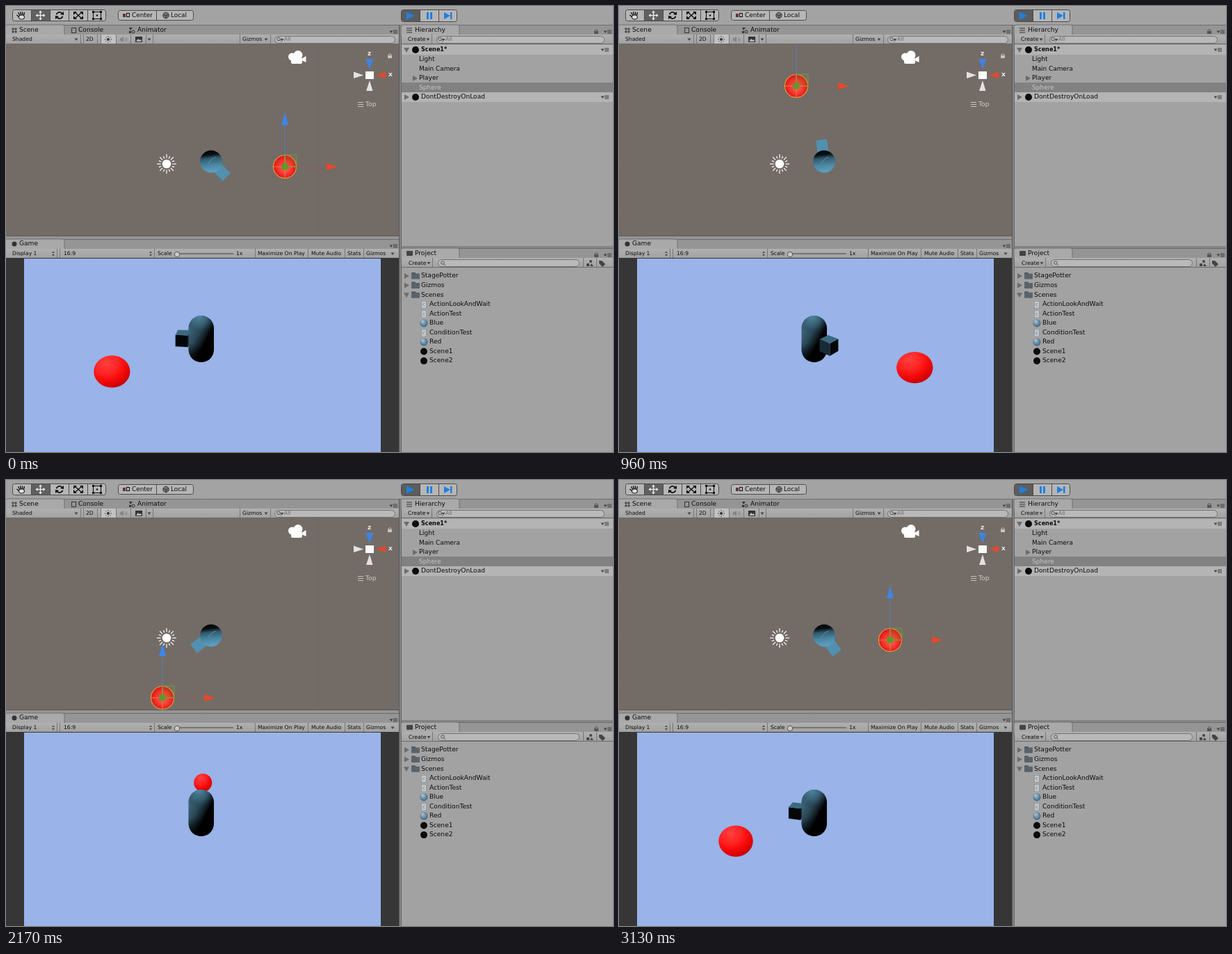
Write an HTML page with a canvas that moves like this. It is 873 px wide and 641 px high and loops after 3.17 s.

```html
<!DOCTYPE html>
<html>
<head>
<meta charset="utf-8">
<style>
html, body { margin: 0; width: 100%; height: 100%; overflow: hidden; background: #a2a2a2 }
canvas { display: block }
</style>
</head>
<body>
<canvas id="stage" width="873" height="641"></canvas>
<script>
const ctx = document.getElementById('stage').getContext('2d');
const LOOP = 3170, STEPS = 73, TAU = Math.PI * 2, INK = '#0c0c0c';
const rad = deg => deg * Math.PI / 180;

// step, ball x, ball y, game offset x, game offset y, look angle in scene, look angle in game
const KEYS = [
  [-13, 324, 309, 1, 0, 217, 217],
  [0, 401, 231, -1, 2, -45, -45],
  [10, 378, 149, -24, 0, 15, 15],
  [22, 255, 115, -3, 0, 97, 97],
  [33, 167, 198, 2, 7, 168, 97],
  [50, 225, 313, 4, 0, 217, 217],
  [59, 324, 309, 1, 0, 217, 217],
  [72, 390, 230, -2, 1, 306, 306],
  [82, 378, 149, -24, 0, 375, 375]
];

function pose(step) {
  let k = 1;
  while (k < 6 && step >= KEYS[k + 1][0]) k++;
  const [a, b, c, d] = KEYS.slice(k - 1, k + 3);
  const span = c[0] - b[0], u = (step - b[0]) / span;
  const lin = i => b[i] + (c[i] - b[i]) * u;
  const curve = i => {
    const m0 = (c[i] - a[i]) / (c[0] - a[0]) * span, m1 = (d[i] - b[i]) / (d[0] - b[0]) * span;
    const s = u * u * (3 - 2 * u);
    return b[i] + (c[i] - b[i]) * s + m0 * u * (1 - u) ** 2 - m1 * u * u * (1 - u);
  };
  return { x: curve(1), y: curve(2), dx: lin(3), dy: lin(4), look: lin(5), gameLook: lin(6) };
}

// drawing helpers
function rect(x, y, w, h, fill, stroke) {
  if (fill) { ctx.fillStyle = fill; ctx.fillRect(x, y, w, h); }
  if (stroke) { ctx.strokeStyle = stroke; ctx.lineWidth = 1; ctx.strokeRect(x + .5, y + .5, w - 1, h - 1); }
}
function pill(x, y, w, h, r, fill, stroke) {
  ctx.beginPath(); ctx.roundRect(x, y, w, h, r); paint(fill, stroke);
}
function paint(fill, stroke, width = 1) {
  if (fill) { ctx.fillStyle = fill; ctx.fill(); }
  if (stroke) { ctx.strokeStyle = stroke; ctx.lineWidth = width; ctx.stroke(); }
}
function dot(x, y, r, fill, stroke, width) {
  ctx.beginPath(); ctx.arc(x, y, r, 0, TAU); paint(fill, stroke, width);
}
function poly(fill, ...p) {
  ctx.beginPath();
  for (let i = 0; i < p.length; i += 2) ctx.lineTo(p[i], p[i + 1]);
  ctx.closePath(); paint(fill);
}
function line(color, width, ...p) {
  ctx.beginPath();
  for (let i = 0; i < p.length; i += 2) ctx.lineTo(p[i], p[i + 1]);
  paint(null, color, width);
}
function text(s, x, y, size = 9.1, color = INK, weight = '') {
  ctx.font = `${weight} ${size}px "DejaVu Sans", sans-serif`;
  ctx.textBaseline = 'middle';
  ctx.fillStyle = color;
  ctx.fillText(s, x, y);
}
function fade(g, ...stops) {
  stops.forEach(([p, c]) => g.addColorStop(p, c));
  return g;
}
const small = (s, x, y) => text(s, x, y, 7.65);
const down = (x, y) => poly('#444', x - 2.5, y - 1.5, x + 2.5, y - 1.5, x, y + 2);
const updown = (x, y) => { poly('#444', x - 2, y - 1, x + 2, y - 1, x, y - 3.5); poly('#444', x - 2, y + 1, x + 2, y + 1, x, y + 3.5); };
const menu = (x, y) => { down(x, y); for (const d of [-2, 0, 2]) line('#444', 1, x + 3, y + d, x + 9, y + d); };
const bars = (x, y, c) => { for (const d of [-3, 0, 3]) line(c, 1, x, y + d, x + 8, y + d); };
function lock(x, y, c) {
  rect(x - 3, y, 6, 4, c);
  ctx.beginPath(); ctx.arc(x, y, 2.2, Math.PI, TAU); paint(null, c);
}
function glass(x, y) { dot(x, y - .5, 2.3, null, '#555'); line('#555', 1, x + 1.7, y + 1.2, x + 4, y + 3.5); }
function fold(x, y, open) {
  if (open) poly('#6b6b6b', x - 4, y - 3, x + 4, y - 3, x, y + 4);
  else poly('#6b6b6b', x - 3, y - 4, x + 4, y, x - 3, y + 4);
}
function tabStrip(x, y, w, tabW) {
  rect(x, y, w, 14, '#959595');
  line('#6c6c6c', 1, x, y + .5, x + w, y + .5);
  pill(x - 1, y, tabW + 1, 15, [3, 3, 0, 0], '#a9a9a9', '#707070');
  menu(x + w - 11, y + 10);
}
function toolbar(x, y, w, seps) {
  rect(x, y, w, 14, fade(ctx.createLinearGradient(0, y, 0, y + 14), [0, '#b0b0b0'], [1, '#a1a1a1']));
  line('#6a6a6a', 1, x, y + 13.5, x + w, y + 13.5);
  for (const s of seps) line('#777', 1, s + .5, y, s + .5, y + 13);
}

function topBar() {
  rect(0, 0, 873, 27, '#a3a3a3');
  pill(9.5, 5.5, 134, 16, 3, '#b6b6b6', '#4b4b4b');
  rect(36, 6, 27, 15, '#606060');
  for (const x of [36, 63, 90, 117]) line('#4b4b4b', 1, x + .5, 6, x + .5, 21);
  // hand
  for (let i = 0; i < 4; i++) line(INK, 1.3, 20 + i * 1.8, 14, 17.5 + i * 3, 8 + Math.abs(i - 1.5) * .8);
  line(INK, 1.3, 19, 16, 15.5, 13);
  pill(18.5, 13, 8, 6, 3, '#ddd', INK);
  // move
  line('#eee', 1.3, 44, 13.5, 55, 13.5); line('#eee', 1.3, 49.5, 8, 49.5, 19);
  for (let i = 0; i < 4; i++) {
    ctx.save(); ctx.translate(49.5, 13.5); ctx.rotate(i * TAU / 4);
    poly('#eee', 7, 0, 4, -2.5, 4, 2.5); ctx.restore();
  }
  // rotate
  for (const a of [3.4, .26]) { ctx.beginPath(); ctx.arc(77, 13.5, 4.6, a, a + 2.3); paint(null, INK, 1.7); }
  poly(INK, 83, 8, 83, 13, 78, 12); poly(INK, 71, 19, 71, 14, 76, 15);
  // scale
  line(INK, 1.3, 99, 9, 109, 18); line(INK, 1.3, 109, 9, 99, 18);
  for (const [x, y, a, b] of [[97, 8, 1, 1], [111, 8, -1, 1], [97, 19, 1, -1], [111, 19, -1, -1]]) poly(INK, x, y, x + 5 * a, y, x, y + 5 * b);
  // rectangle
  rect(125, 8, 12, 11, null, INK);
  for (const x of [124, 135]) for (const y of [7, 17]) rect(x, y, 3, 3, INK);
  dot(131, 13.5, 1.2, INK);

  pill(161.5, 6.5, 108, 14, 3, '#b6b6b6', '#4b4b4b');
  line('#4b4b4b', 1, 216.5, 7, 216.5, 20);
  rect(168, 11, 4, 5, '#633'); rect(173, 10, 5, 6, null, INK);
  text('Center', 181, 13.5, 8.9);
  dot(230, 13.5, 4.2, '#777', '#333'); line('#333', 1, 226, 12, 230, 14, 234, 12); line('#333', 1, 230, 14, 230, 18);
  text('Local', 237, 13.5, 8.9);

  pill(568.5, 5.5, 80, 17, 3, '#b6b6b6', '#4b4b4b');
  rect(569, 6, 27, 16, '#5c5c5c');
  for (const x of [595, 622]) line('#4b4b4b', 1, x + .5, 6, x + .5, 22);
  const blue = '#1f7fe0';
  poly(blue, 576, 8.5, 588, 14, 576, 19.5);
  rect(605, 9, 3, 10, blue); rect(610, 9, 3, 10, blue);
  poly(blue, 630, 9, 639, 14, 630, 19); rect(639, 9, 2.5, 10, blue);
}

function leftPanels() {
  tabStrip(0, 27, 565, 84);
  for (const d of [10, 14]) { line('#333', 1, d, 31, d, 39); line('#333', 1, 8, d + 23, 16, d + 23); }
  text('Scene', 19, 35);
  rect(94, 31, 7, 8, null, '#333'); text('Console', 104, 35);
  poly('#333', 177, 31, 182, 31, 179, 35); dot(183, 37, 2, null, '#333'); rect(177, 36, 3, 3, '#333'); text('Animator', 189, 35);
  toolbar(0, 41, 565, [107, 111, 131, 136, 158, 179, 201, 211, 336, 380]);
  small('Shaded', 9, 48.5); down(101, 48); small('2D', 115, 48.5);
  rect(137, 41, 21, 13, '#c2c2c2');
  dot(147, 48, 2, '#333');
  for (let i = 0; i < 8; i++) {
    const c = Math.cos(i * TAU / 8), s = Math.sin(i * TAU / 8);
    line('#333', 1, 147 + 3.5 * c, 48 + 3.5 * s, 147 + 5 * c, 48 + 5 * s);
  }
  poly('#858585', 164, 46, 166, 46, 169, 43.5, 169, 52, 166, 50, 164, 50);
  for (const r of [2, 4]) { ctx.beginPath(); ctx.arc(170, 48, r, -.9, .9); paint(null, '#858585'); }
  rect(186, 44, 10, 8, '#333'); poly('#bbb', 187, 51, 190, 47, 192, 49, 194, 48, 195, 51);
  down(206, 48); small('Gizmos', 340, 48.5); down(374, 48);
  pill(386.5, 43.5, 173, 10, 5, '#b9b9b9', '#727272');
  glass(392, 48); down(397, 48.5); text('All', 400, 48.5, 7.65, '#6a6a6a');

  rect(0, 331, 565, 4, '#959595');
  tabStrip(0, 335, 565, 84);
  dot(12, 342, 3.5, '#333');
  text('Game', 19, 342);
  toolbar(0, 349, 565, [73, 77, 213, 358, 434, 487, 514]);
  small('Display 1', 9, 356); updown(68, 356); small('16:9', 83, 356); updown(208, 356);
  small('Scale', 218, 356.5);
  rect(245, 355, 82, 2, '#747474'); dot(246, 357, 3.7, '#c9c9c9', '#555');
  small('1x', 331, 356.5); small('Maximize On Play', 362, 356); small('Mute Audio', 439, 356);
  small('Stats', 491, 356); small('Gizmos', 518, 356); down(556, 356);
}

function rightPanels() {
  rect(565, 27, 4, 614, '#858585');
  line('#555', 1, 565.5, 27, 565.5, 641); line('#666', 1, 568.5, 27, 568.5, 641);
  tabStrip(569, 27, 304, 83);
  bars(576, 35, '#333'); text('Hierarchy', 588, 35); lock(849, 36, '#555');
  toolbar(569, 41, 304, [612]);
  small('Create', 578, 48.5); down(607, 48);
  pill(619.5, 43.5, 241, 10, 5, '#b9b9b9', '#727272');
  glass(624, 48); down(629, 48.5); text('All', 632, 48.5, 7.65, '#6a6a6a');
  rect(569, 55, 304, 290, '#a2a2a2');
  for (const y of [56, 124]) { rect(569, y, 304, 14, '#b4b4b4'); menu(858, y + 7); }
  rect(569, 110, 304, 14, '#818181');
  fold(576, 63, true); dot(589, 63, 5, INK); text('Scene1*', 597, 63, 8.1, INK, 'bold');
  text('Light', 594, 77, 9); text('Main Camera', 594, 90.5, 8.9);
  fold(588, 104); text('Player', 594, 104);
  text('Sphere', 594, 117.5, 9, '#c6c6c6');
  fold(576, 131); dot(589, 131, 5, INK); text('DontDestroyOnLoad', 597, 131);

  rect(569, 345, 304, 3, '#858585');
  tabStrip(569, 348, 304, 83);
  pill(576, 352, 9, 7, 1, '#444'); text('Project', 588, 355.5); lock(849, 357, '#555');
  toolbar(569, 362, 304, [613, 830, 849]);
  small('Create', 579, 370); down(608, 369.5);
  pill(621.5, 364.5, 203, 10, 5, '#b9b9b9', '#727272'); glass(628, 369.5);
  dot(841, 367, 2, '#444'); rect(835, 370, 4, 4, '#444'); poly('#444', 840, 374, 842, 370, 845, 374);
  poly('#444', 853, 366, 857, 366, 862, 371, 858, 375, 853, 370);
  rect(569, 376, 304, 265, '#a2a2a2');
  ['StagePotter', 'Gizmos', 'Scenes'].forEach((s, i) => {
    const y = 388 + i * 13.6;
    fold(576, y, i == 2);
    pill(583, y - 5, 6, 4, 1, '#4d555c'); pill(583, y - 3.5, 12, 8, 1, '#59636b');
    text(s, 597, y);
  });
  ['ActionLookAndWait', 'ActionTest', 'Blue', 'ConditionTest', 'Red', 'Scene1', 'Scene2'].forEach((s, i) => {
    const y = 428.8 + i * 13.55;
    if (i > 4) dot(601, y, 5, INK);
    else if (i == 2 || i == 4) dot(601, y, 5.5, fade(ctx.createRadialGradient(599, y - 3, 1, 601, y, 6), [0, '#a5c0d3'], [1, '#38607f']));
    else { rect(597, y - 5, 8, 11, '#c6cace', '#949494'); text('c', 599, y + .5, 7, '#4a78a5'); }
    text(s, 609, y);
  });
}

function sceneView(p) {
  ctx.save();
  ctx.beginPath(); ctx.rect(0, 55, 565, 276); ctx.clip();
  rect(0, 55, 565, 276, '#736b66');
  const grid = 'rgba(255,255,255,.02)';
  for (let x = 3; x < 565; x += 73) line(grid, 1, x + .5, 55, x + .5, 331);
  for (let y = 77; y < 331; y += 73) line(grid, 1, 0, y + .5, 565, y + .5);

  // player seen from above
  ctx.save(); ctx.translate(295, 223.5); ctx.rotate(-rad(p.look));
  rect(10, -8, 21.5, 16, '#5190b0'); ctx.restore();
  dot(295, 223.5, 16, fade(ctx.createLinearGradient(293, 207, 297, 240), [0, '#000'], [.2, '#0a1015'], [.36, '#315a6d'], [.65, '#4a86a3'], [1, '#62a4c6']));
  line('rgba(200,225,240,.35)', 1, 291, 226, 297, 219, 302, 217);

  // ball with its move handle
  const { x, y } = p;
  dot(x, y, 16.5, fade(ctx.createRadialGradient(x + 1, y + 3, 2, x, y, 17), [0, '#ff5a50'], [.6, '#f5302c'], [1, '#cf1512']), '#eb9a3a', 1.2);
  line('rgba(210,70,50,.3)', 1, x + 17, y, x + 60, y);
  line('#5b83ad', 1, x, y, x, y - 61);
  line('#e0803a', 1, x - 16, y, x + 16, y); line('#d98a45', 1, x, y - 16, x, y + 16);
  ctx.beginPath(); ctx.rect(x, y - 17, 17, 17); paint('rgba(90,160,40,.12)', '#7d9240');
  dot(x, y, 5, '#5f9a28');
  poly('#3d87ea', x, y - 78, x + 5, y - 60, x - 5, y - 60);
  poly('#e8472b', x + 76, y, x + 60, y - 5, x + 60, y + 5);

  // light and camera icons
  dot(231, 227, 6.3, '#fff');
  for (let i = 0; i < 16; i++) {
    const c = Math.cos(i * TAU / 16), s = Math.sin(i * TAU / 16), r = i % 2 ? 12 : 14;
    line('#fff', 1.2, 231 + 8.5 * c, 227 + 8.5 * s, 231 + r * c, 227 + r * s);
  }
  dot(411.5, 73, 5.5, '#fff'); dot(420, 70.5, 6.5, '#fff');
  pill(410, 74, 16, 9, 2, '#fff'); poly('#fff', 425, 76, 431.5, 72, 431.5, 81, 425, 78);

  // view axes
  poly('#3f83dd', 517, 76, 528.5, 76, 523, 91);
  poly('#e2e2e2', 500, 94.5, 500, 104, 514, 99.5);
  poly('#e2e2e2', 518, 122, 527.5, 122, 523, 107);
  poly('#e04a2c', 546, 94.5, 546, 104, 532, 99.5);
  rect(517, 94, 12, 11, '#fafafa');
  text('z', 520, 69, 9, '#eee', 'bold'); text('x', 550, 99, 9, '#eee', 'bold');
  bars(506, 141.5, '#c6c3c0'); text('Top', 517, 141.5, 9.3, '#d0cdca');
  lock(552, 71, '#c6c3c0');
  ctx.restore();
  line('#5a5a5a', 1, 0, 330.5, 565, 330.5);
}

function gameBall(x, y, rx, ry) {
  ctx.save(); ctx.translate(x, y); ctx.scale(rx, ry);
  dot(0, 0, 1, fade(ctx.createRadialGradient(-.3, -.5, 0, -.3, -.5, 1.6), [0, '#ff4040'], [.4, '#ff2424'], [.65, '#f80a0a'], [1, '#c40000']));
  ctx.restore();
}

// box on the capsule: corners run along its look direction, sideways and up
function gameBox(deg) {
  const corner = (f, s, h) => {
    const a = rad(deg), fx = 27 + 9 * f, sx = 9 * s;
    const ex = fx * Math.cos(a) - sx * Math.sin(a), ny = fx * Math.sin(a) + sx * Math.cos(a);
    const right = -.768 * ex + .64 * ny, near = .64 * ex + .768 * ny, k = 1 / (1 - near * .0032);
    return [281 + right * k, 478.5 + (near * .45 - 9 * h * .9) * k];
  };
  const face = (light, ...corners) => {
    const q = corners.map(c => corner(...c));
    const area = q.reduce((sum, [x, y], i) => { const [u, v] = q[(i + 1) % 4]; return sum + x * v - y * u; }, 0);
    if (area > 0) poly(`rgb(${[82, 142, 173].map(c => c * light | 0)})`, ...q.flat());
  };
  const lit = turn => .05 + .64 * Math.max(0, Math.cos(rad(deg + turn + 60)));
  face(lit(0), [1, -1, 1], [1, 1, 1], [1, 1, -1], [1, -1, -1]);
  face(lit(180), [-1, 1, 1], [-1, -1, 1], [-1, -1, -1], [-1, 1, -1]);
  face(lit(90), [1, 1, 1], [-1, 1, 1], [-1, 1, -1], [1, 1, -1]);
  face(lit(-90), [-1, -1, 1], [1, -1, 1], [1, -1, -1], [-1, -1, -1]);
  face(.74, [1, 1, 1], [1, -1, 1], [-1, -1, 1], [-1, 1, 1]);
}

function capsule() {
  const layer = fill => pill(262.5, 445, 36.5, 67, 18.2, fill);
  layer(fade(ctx.createLinearGradient(263, 470, 287, 483), [0, '#3a6275'], [.45, '#294756'], [.8, '#111d23'], [1, '#000']));
  layer(fade(ctx.createRadialGradient(278, 446, 2, 277, 448, 23), [0, 'rgba(78,132,157,.9)'], [.55, 'rgba(56,97,117,.7)'], [1, 'rgba(30,55,68,0)']));
  layer(fade(ctx.createLinearGradient(0, 485, 0, 512), [0, 'rgba(0,0,0,0)'], [1, 'rgba(0,0,0,.85)']));
}

function gameView(p) {
  rect(0, 362, 565, 279, '#363636');
  rect(26, 363, 513, 278, '#9ab3e8');
  ctx.save();
  ctx.beginPath(); ctx.rect(26, 363, 513, 278); ctx.clip();
  const u = p.x - 419, v = p.y - 74;
  const depth = -.64 * u + .768 * v, q = .28 + .00296 * depth;
  const off = (-.768 * u - .64 * v) / q + p.dx, ry = 15.5 / q;
  const ball = () => gameBall(282.5 + off, 321 + 135.8 / q + p.dy, ry * (1 + off * off / 130000), ry);
  const boxNear = Math.cos(rad(p.gameLook - 50)) > 0;
  if (depth > 194) ball();
  if (!boxNear) gameBox(p.gameLook);
  capsule();
  if (boxNear) gameBox(p.gameLook);
  if (depth <= 194) ball();
  ctx.restore();
}

function draw() {
  const step = Math.min(STEPS - 1, Math.floor(performance.now() % LOOP / LOOP * STEPS + .1));
  const p = pose(step);
  topBar();
  leftPanels();
  rightPanels();
  sceneView(p);
  gameView(p);
  requestAnimationFrame(draw);
}
draw();
</script>
</body>
</html>
```
